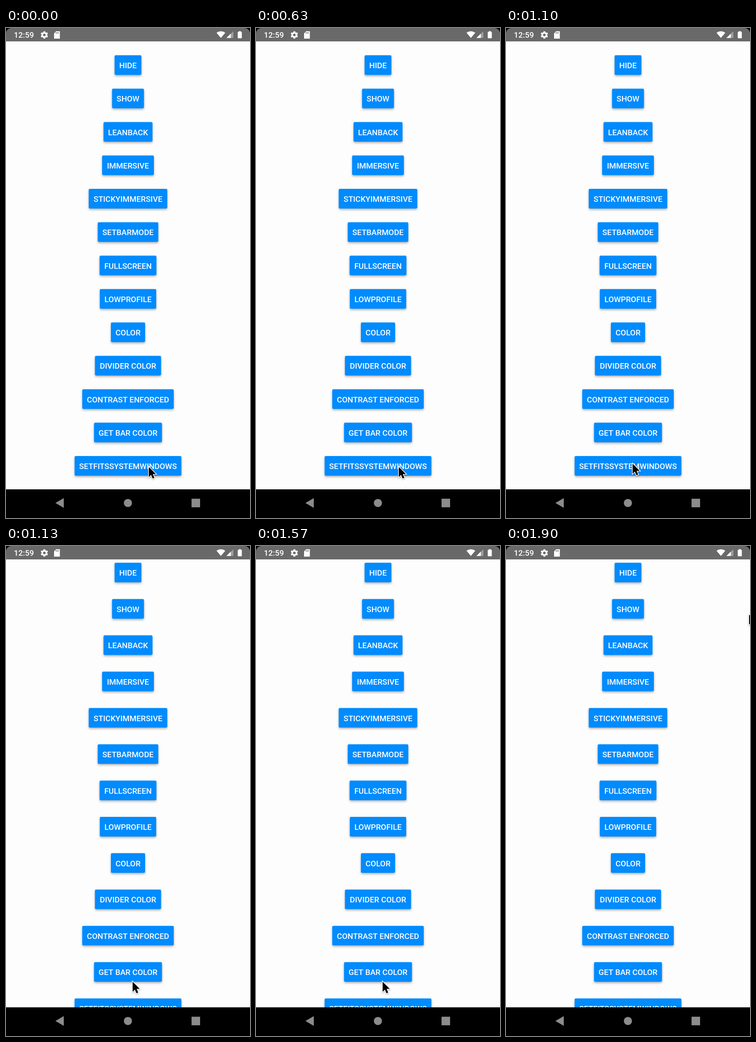
An HTML page with a canvas that plays this animation: 528x1060 px, repeating every 1.93 s.

```html
<!DOCTYPE html>
<html lang="en">
<head>
<meta charset="utf-8">
<title>System bar demo</title>
<style>
html, body { margin: 0; width: 100%; height: 100%; overflow: hidden; background: #000; }
canvas { display: block; width: 528px; height: 1060px; }
</style>
</head>
<body>
<canvas id="stage" width="528" height="1060"></canvas>
<script>
const ctx = document.getElementById('stage').getContext('2d');
const W = 528, H = 1060, BAR = 29, NAV = 998, LOOP = 1930;
const FONT = 'Roboto, Arial, sans-serif';
const BAR_COLOR = '#696969';

// label and button width
const buttons = [
  ['HIDE', 58], ['SHOW', 69], ['LEANBACK', 106], ['IMMERSIVE', 112],
  ['STICKYIMMERSIVE', 170], ['SETBARMODE', 131], ['FULLSCREEN', 123],
  ['LOWPROFILE', 122], ['COLOR', 74], ['DIVIDER COLOR', 143],
  ['CONTRAST ENFORCED', 198], ['GET BAR COLOR', 147], ['SETFITSSYSTEMWINDOWS', 231]
];

function poly(points, color) {
  ctx.beginPath();
  points.forEach(([x, y]) => ctx.lineTo(x, y));
  ctx.closePath();
  ctx.fillStyle = color;
  ctx.fill();
}

function disc(x, y, r, color) {
  ctx.beginPath();
  ctx.arc(x, y, r, 0, Math.PI * 2);
  ctx.fillStyle = color;
  ctx.fill();
}

function rect(x, y, w, h, color) {
  ctx.fillStyle = color;
  ctx.fillRect(x, y, w, h);
}

function drawButton(label, width, top) {
  ctx.save();
  ctx.shadowColor = 'rgba(0,0,0,0.32)';
  ctx.shadowBlur = 5;
  ctx.shadowOffsetY = 2.5;
  ctx.beginPath();
  ctx.roundRect(W / 2 - width / 2, top, width, 42.4, 2.4);
  ctx.fillStyle = '#008bfe';
  ctx.fill();
  ctx.restore();
  ctx.fillStyle = '#fff';
  ctx.font = '500 17.1px ' + FONT;
  ctx.textAlign = 'center';
  ctx.fillText(label, W / 2, top + 28.1);
}

function drawGear(x, y) {
  for (let i = 0; i < 6; i++) {
    ctx.save();
    ctx.translate(x, y);
    ctx.rotate(i * Math.PI / 3);
    poly([[-2.7, -4], [-1.8, -8], [1.8, -8], [2.7, -4]], '#fff');
    ctx.restore();
  }
  disc(x, y, 6, '#fff');
  disc(x, y, 2.8, BAR_COLOR);
}

function drawStatusBar() {
  rect(0, 0, W, BAR, BAR_COLOR);
  ctx.fillStyle = '#fff';
  ctx.font = '500 17.1px ' + FONT;
  ctx.textAlign = 'left';
  ctx.fillText('12:59', 17, 21);
  drawGear(83, 15);

  poly([[108.5, 7], [116.5, 7], [116.5, 23], [104, 23], [104, 11.7]], '#fff');
  for (let i = 0; i < 3; i++) rect(107.6 + i * 2.5, 9, 1.3, 3.2, BAR_COLOR);

  ctx.beginPath();
  ctx.moveTo(465, 21.5);
  ctx.lineTo(455.5, 10.2);
  ctx.quadraticCurveTo(465, 3.6, 474.5, 10.2);
  ctx.closePath();
  ctx.fillStyle = '#fff';
  ctx.fill();

  poly([[492, 7], [492, 21.5], [477, 21.5]], 'rgba(255,255,255,0.35)');
  poly([[486.5, 12.3], [486.5, 21.5], [477, 21.5]], '#fff');

  rect(504, 6.8, 4, 2, '#fff');
  ctx.beginPath();
  ctx.roundRect(501.5, 8.2, 8.8, 14, 1);
  ctx.fill();

  // rounded screen corners
  ctx.beginPath();
  ctx.rect(0, 0, W, BAR);
  ctx.roundRect(0, 0, W, 60, [12, 12, 0, 0]);
  ctx.save();
  ctx.clip('evenodd');
  rect(0, 0, W, 12, '#000');
  ctx.restore();
}

function drawNavBar() {
  const gray = '#8c8c8c';
  rect(0, NAV, W, H - NAV, '#000');
  poly([[107, 1027.5], [125, 1017], [125, 1038]], gray);
  disc(263.8, 1027.5, 8.8, gray);
  rect(401.5, 1018.3, 18.5, 18.5, gray);
}

function drawCursor(x, y) {
  ctx.save();
  ctx.translate(x + 1, y + 1.5);
  ctx.scale(1.36, 1.36);
  ctx.beginPath();
  [[0, 0], [0, 16], [3.6, 12.6], [6.1, 18.4], [8.9, 17.2], [6.4, 11.4], [11.3, 11.4]]
    .forEach(([px, py]) => ctx.lineTo(px, py));
  ctx.closePath();
  ctx.shadowColor = 'rgba(0,0,0,0.3)';
  ctx.shadowBlur = 3;
  ctx.shadowOffsetY = 1.5;
  ctx.strokeStyle = '#fff';
  ctx.lineWidth = 2;
  ctx.stroke();
  ctx.shadowColor = 'transparent';
  ctx.fillStyle = '#000';
  ctx.fill();
  ctx.restore();
}

const mix = (a, b, u) => a + (b - a) * u;

function ease(n, from, to) {
  const u = Math.min(1, Math.max(0, (n - from) / (to - from)));
  return u * u * (3 - 2 * u);
}

function cursorAt(n) {
  const a = ease(n, 22, 32), b = ease(n, 48, 57);
  return [mix(mix(308, 273, a), 525, b), mix(mix(948, 941, a), 147, b)];
}

function draw(t) {
  // 30 steps per second, rounded to 10 ms
  const n = Math.floor((t / 10 + 1 / 3) * 0.3 + 1e-6);
  const spread = n >= 34;
  const top = spread ? 36.2 : 59, gap = spread ? 78.55 : 72.25;
  rect(0, 0, W, H, '#fdfdfd');
  buttons.forEach(([label, width], i) => drawButton(label, width, top + gap * i));
  drawStatusBar();
  drawNavBar();
  drawCursor(...cursorAt(n));
}

function tick() {
  draw(performance.now() % LOOP);
  requestAnimationFrame(tick);
}
tick();
</script>
</body>
</html>
```
